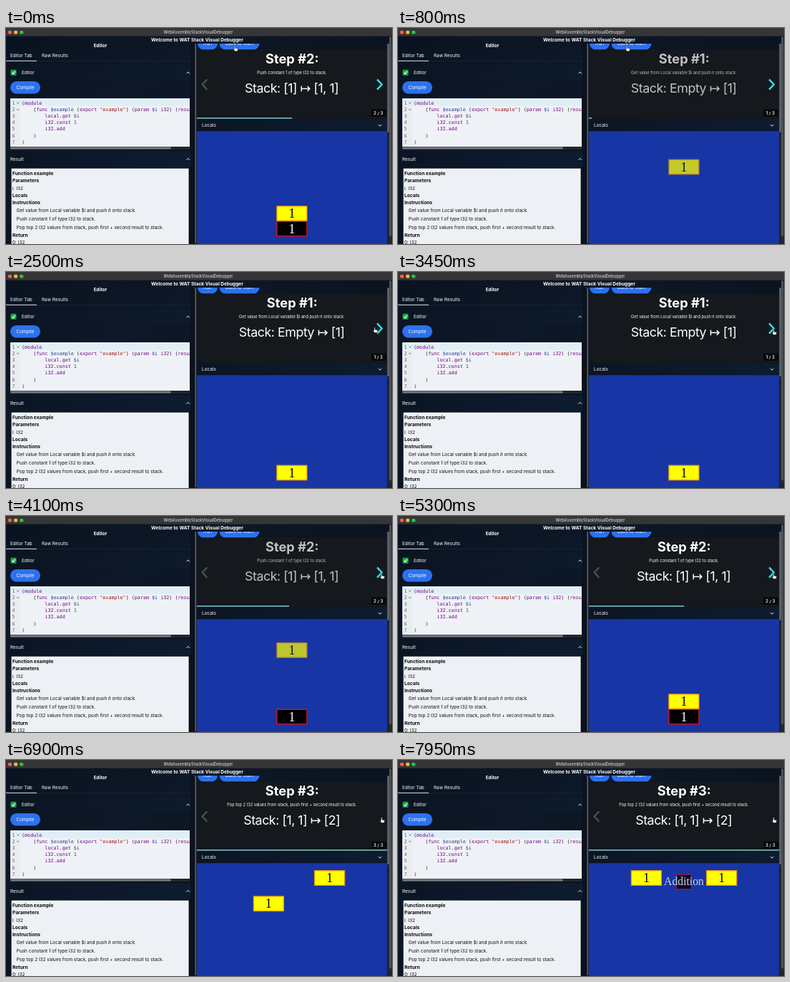
Animation of 540 by 304 pixels, one loop 8 s. Source, as an HTML page:

```html
<!DOCTYPE html>
<html lang="en">
<head>
<meta charset="utf-8">
<title>Stack debugger</title>
<style>
  html, body { margin: 0; width: 100%; height: 100%; overflow: hidden; background: #0a111b; }
  svg { display: block; width: 100%; height: 100%; }
  text { font: 6.45px Inter, sans-serif; fill: #fff; white-space: pre; }
  .mid { text-anchor: middle; }
  .bold { font-weight: 700; }
  .welcome { font-size: 6.55px; }
  .window { font-size: 5.55px; font-weight: 600; fill: #c0bfc1; }
  .code { font: 6.72px "DejaVu Sans Mono", monospace; fill: #222; }
  .num { fill: #666; }
  .key { fill: #770088; }
  .str { fill: #a11; }
  .lit { fill: #164; }
  .var { fill: #2a3f8f; }
  .out { fill: #0c0c0c; }
  .out.bold { font-size: 6.65px; }
  .step { font-size: 18.3px; font-weight: 700; }
  .note { font-size: 5.7px; }
  .stack { font-size: 17.9px; font-weight: 400; letter-spacing: -.5px; }
  .count { font-size: 5.6px; font-weight: 600; letter-spacing: .3px; }
  .serif { font: 18px "Liberation Serif", serif; }
  .operation { font-size: 15.7px; }
  .chevron { fill: none; stroke: #e4e9ef; stroke-width: 1; }
  .nav { fill: none; stroke-width: 2.5; }
</style>
</head>
<body>
<svg viewBox="0 0 540 304" preserveAspectRatio="none">
  <defs>
    <linearGradient id="page" x1="0" y1="0" x2="1" y2="1">
      <stop offset="0" stop-color="#09121f"/>
      <stop offset=".3" stop-color="#0d1828"/>
      <stop offset=".65" stop-color="#09111c"/>
      <stop offset="1" stop-color="#080c13"/>
    </linearGradient>
    <linearGradient id="header">
      <stop offset="0" stop-color="#0b1524"/>
      <stop offset="1" stop-color="#0e1c30"/>
    </linearGradient>
    <clipPath id="editorClip"><rect x="6" y="99" width="251" height="68"/></clipPath>
    <clipPath id="toolbarClip"><rect x="267" y="22" width="267" height="9"/></clipPath>
  </defs>

  <rect width="540" height="304" fill="url(#page)"/>
  <rect width="540" height="11.5" fill="#363537"/>
  <circle cx="5.5" cy="6" r="2.6" fill="#ff5f57"/>
  <circle cx="13.6" cy="6" r="2.6" fill="#febc2e"/>
  <circle cx="21.7" cy="6" r="2.6" fill="#28c840"/>
  <text class="window mid" x="269" y="8">WebAssemblyStackVisualDebugger</text>
  <text class="welcome bold mid" x="267.5" y="19.4">Welcome to WAT Stack Visual Debugger</text>

  <text class="bold mid" x="132" y="27.2">Editor</text>
  <text x="6" y="40.5">Editor Tab</text>
  <text x="50" y="40.5">Raw Results</text>
  <path d="M0 46.6H258" stroke="#1f2c3f" stroke-width=".6"/>
  <path d="M0 46.3H43" stroke="#dfe7f0" stroke-width="1"/>
  <rect x="0" y="52" width="259" height="21" fill="url(#header)" opacity=".6"/>
  <rect x="6.5" y="58.8" width="8" height="8" rx="1.2" fill="#1fa544"/>
  <path d="M8.3 62.8l1.7 2 2.8-4" fill="none" stroke="#fff" stroke-width="1.2"/>
  <text x="22" y="65.2">Editor</text>
  <path class="chevron" d="M252.5 64.2l2.3-2.4 2.3 2.4"/>
  <rect x="6" y="75" width="42" height="17.5" rx="8.7" fill="#2d71ee"/>
  <text class="mid" x="27" y="86">Compile</text>

  <rect x="6" y="99" width="251" height="68" fill="#eef2f6"/>
  <rect x="6" y="99" width="14" height="68" fill="#e9edf0"/>
  <rect x="6" y="100.5" width="251" height="9.2" fill="#e0eef6"/>
  <g id="editor" clip-path="url(#editorClip)"></g>
  <path d="M15.2 104.6l1.6 1.7 1.6-1.7M15.2 113.8l1.6 1.7 1.6-1.7" fill="none" stroke="#555" stroke-width=".8"/>
  <rect x="6" y="167" width="251" height="4" fill="#22272e"/>
  <rect x="6" y="167.5" width="225" height="3" rx="1.5" fill="#777b80"/>

  <rect x="0" y="173" width="259" height="23" fill="url(#header)"/>
  <text x="6" y="186.8">Result</text>
  <path class="chevron" d="M252.5 185.7l2.3-2.4 2.3 2.4"/>
  <rect x="7.6" y="197.7" width="248" height="106.3" fill="#edf1f5"/>
  <g id="output"></g>
  <rect x="258.5" y="22" width="8.5" height="282" fill="#0b121c"/>
  <rect x="264.3" y="22" width="2" height="281" rx="1" fill="#525a65"/>

  <g clip-path="url(#toolbarClip)">
    <rect x="268" y="13" width="28" height="17.5" rx="8.7" fill="#2d71ee"/>
    <rect x="298.5" y="13" width="56" height="17.5" rx="8.7" fill="#2d71ee"/>
    <text class="mid" x="282" y="24">Run</text>
    <text class="mid" x="326.5" y="24">Back to Start</text>
  </g>
  <rect x="267" y="30.5" width="266.5" height="97.5" fill="#15181c"/>
  <g id="slides"></g>
  <path id="prev" class="nav" d="M281.3 72.3l-6.6 7.2 6.6 7.2" stroke="#3b5459"/>
  <path id="next" class="nav" d="M519.2 72.3l6.6 7.2-6.6 7.2" stroke="#31dce6"/>
  <rect x="511" y="114.5" width="21" height="10.5" fill="#08090b"/>
  <text id="count" class="count mid" x="521" y="121.9"></text>
  <rect id="bar" x="267" y="126.1" height="1.5" fill="#7accd5"/>
  <rect x="267" y="128.2" width="266.5" height="17" fill="url(#header)"/>
  <text x="274" y="138.9">Locals</text>
  <path class="chevron" d="M520.8 135.8l2.3 2.4 2.3-2.4"/>

  <rect x="267" y="145.2" width="266.5" height="158.8" fill="#1735a5"/>
  <rect x="533.5" y="22" width="6.5" height="282" fill="#20252d"/>
  <rect x="533.5" y="22" width="2.4" height="125" rx="1.2" fill="#666b73"/>
  <rect x="536.2" y="12" width="3" height="281.5" rx="1.5" fill="#50555d"/>

  <g id="blocks"></g>
  <g id="sum">
    <rect x="389.5" y="161.3" width="21" height="20.5" fill="#000" stroke="#c8102a" stroke-width="1.2"/>
    <text class="serif operation mid" x="400" y="176">Addition</text>
  </g>
  <path id="cursor" d="M-1 0c0-1.2 1.5-1.2 1.5 0v2.4l2.6.6c.9.3 1 .9.8 1.8l-.6 2.2h-3.6l-2-2.6c-.5-.8.4-1.3 1.3-.4z" fill="#fff" stroke="#111" stroke-width=".6"/>
</svg>

<script>
const LOOP = 8000, CLICKS = { start: 250, second: 3550, third: 5450 };
const $ = id => document.getElementById(id);
const clamp = v => Math.min(1, Math.max(0, v));
const span = (t, from, length) => clamp((t - from) / length);
const mix = (a, b, p) => a + (b - a) * p;
const easeInOut = p => p < .5 ? 2 * p * p : 1 - 2 * (1 - p) ** 2;

function bezier(x1, y1, x2, y2) {
  const at = (a, b, s) => 3 * a * s * (1 - s) ** 2 + 3 * b * s * s * (1 - s) + s ** 3;
  return x => {
    let low = 0, high = 1;
    for (let i = 0; i < 18; i++) {
      const s = (low + high) / 2;
      if (at(x1, x2, s) < x) low = s; else high = s;
    }
    return at(y1, y2, low);
  };
}
const ease = bezier(.25, .1, .25, 1);
const barEase = bezier(.26, .86, .44, .985);

// Code tokens: k keyword, s string, l literal, v variable, p plain.
const classes = { k: 'key', s: 'str', l: 'lit', v: 'var', p: '' };
const code = [
  [['p', '('], ['k', 'module']],
  [['p', '    ('], ['k', 'func'], ['v', ' $example'], ['p', ' ('], ['k', 'export'], ['s', ' "example"'],
   ['p', ') ('], ['k', 'param'], ['v', ' $i'], ['k', ' i32'], ['p', ') ('], ['k', 'result']],
  [['k', '        local.get'], ['v', ' $i']],
  [['k', '        i32.const'], ['l', ' 1']],
  [['k', '        i32.add']],
  [['p', '    )']],
  [['p', ')']]
];
$('editor').innerHTML = code.map((tokens, i) => {
  const y = 107.5 + i * 9.2;
  const spans = tokens.map(([kind, s]) => `<tspan class="${classes[kind]}">${s}</tspan>`).join('');
  return `<text class="code num" x="8.6" y="${y}">${i + 1}</text><text class="code" x="22" y="${y}" xml:space="preserve">${spans}</text>`;
}).join('');

const notes = [
  'Get value from Local variable $i and push it onto stack.',
  'Push constant 1 of type I32 to stack.',
  'Pop top 2 I32 values from stack, push first + second result to stack.'
];
const line = (y, s, bold, x = 9) => `<text class="out ${bold ? 'bold' : ''}" x="${x}" y="${y}">${s}</text>`;
$('output').innerHTML =
  line(207, 'Function example', true) + line(217.3, 'Parameters', true) + line(227.5, 'i: I32') +
  line(237.7, 'Locals', true) + line(247.7, 'Instructions', true) +
  notes.map((s, i) => line(259.4 + i * 11.7, s, false, 14.8)).join('') +
  line(294.3, 'Return', true) + line(304.4, '0: I32');

const stacks = ['Empty ↦ [1]', '[1] ↦ [1, 1]', '[1, 1] ↦ [2]'];
$('slides').innerHTML = stacks.map((s, i) => `<g>
  <text class="step mid" x="400.3" y="49.7">Step #${i + 1}:</text>
  <text class="note mid" x="400" y="64.7">${notes[i]}</text>
  <text class="stack mid" x="399.7" y="91.3">Stack: ${s}</text></g>`).join('');

$('blocks').innerHTML = ['upper', 'lower'].map(id => `<g id="${id}">
  <rect x=".75" y=".75" width="42" height="20.6" stroke-width="1.3"/>
  <text class="serif mid" x="21.7" y="17">1</text></g>`).join('');

function place(id, [x, y], opacity, dark) {
  const group = $(id), [box, label] = group.children;
  group.setAttribute('transform', `translate(${x} ${y})`);
  group.setAttribute('opacity', opacity);
  box.setAttribute('fill', dark ? '#000' : '#ff0');
  box.setAttribute('stroke', dark ? '#e8101c' : '#f09a10');
  label.style.fill = dark ? '#fff' : '#000';
}

const X = 378.2, TOP = 155, UPPER = 250.1, LOWER = 271.5;
const travel = (a, b, p) => [mix(a[0], b[0], p), mix(a[1], b[1], p)];

function drawBlocks(t) {
  const home = [X, UPPER];
  const falling = (start, bottom) => [X, mix(TOP, bottom, easeInOut(span(t, start, 1000)))];
  const pop = easeInOut(span(t, 5480, 720));
  const secondPop = easeInOut(span(t, 6495, 720));

  if (t < CLICKS.start) {
    place('upper', home, 1, false);
    place('lower', [X, LOWER], 1, true);
  } else if (t < CLICKS.third) {
    place('upper', falling(3755, UPPER), span(t, 3755, 480), false);
    place('lower', falling(445, LOWER), span(t, 445, 480), t >= CLICKS.second);
  } else {
    place('upper', travel(home, [431, TOP], pop), 1, false);
    place('lower', travel([X, mix(LOWER, UPPER, pop)], [325.7, TOP], secondPop), 1, false);
  }
  $('sum').setAttribute('opacity', .8 * span(t, 7350, 620));
}

function drawSlides(t) {
  let step = 1, since = LOOP, from = .5;
  if (t >= CLICKS.third) [step, since] = [2, t - CLICKS.third];
  else if (t >= CLICKS.second) [since, from] = [t - CLICKS.second, 0];
  else if (t >= CLICKS.start) [step, since] = [0, t - CLICKS.start];

  const shown = ease(span(since, 200, 800));
  [...$('slides').children].forEach((slide, i) => slide.setAttribute('opacity', i === step ? shown : 0));
  $('bar').setAttribute('width', 266.5 * mix(from, step / 2, barEase(span(since, 0, 800))));
  $('count').textContent = `${step + 1} / 3`;
  $('prev').setAttribute('opacity', step > 0 ? 1 : 0);
  $('next').setAttribute('opacity', step < 2 ? 1 : 0);
}

function drawCursor(t) {
  const across = easeInOut(span(t, 1700, 800));
  const settle = easeInOut(span(t, 2500, 450));
  const x = mix(mix(320.5, 516, across), 525.7, settle);
  const y = mix(mix(25.7, 78.6, across), 81.6, settle);
  $('cursor').setAttribute('transform', `translate(${x} ${y})`);
}

function frame() {
  const t = performance.now() % LOOP;
  drawBlocks(t);
  drawSlides(t);
  drawCursor(t);
  requestAnimationFrame(frame);
}
frame();
</script>
</body>
</html>
```
